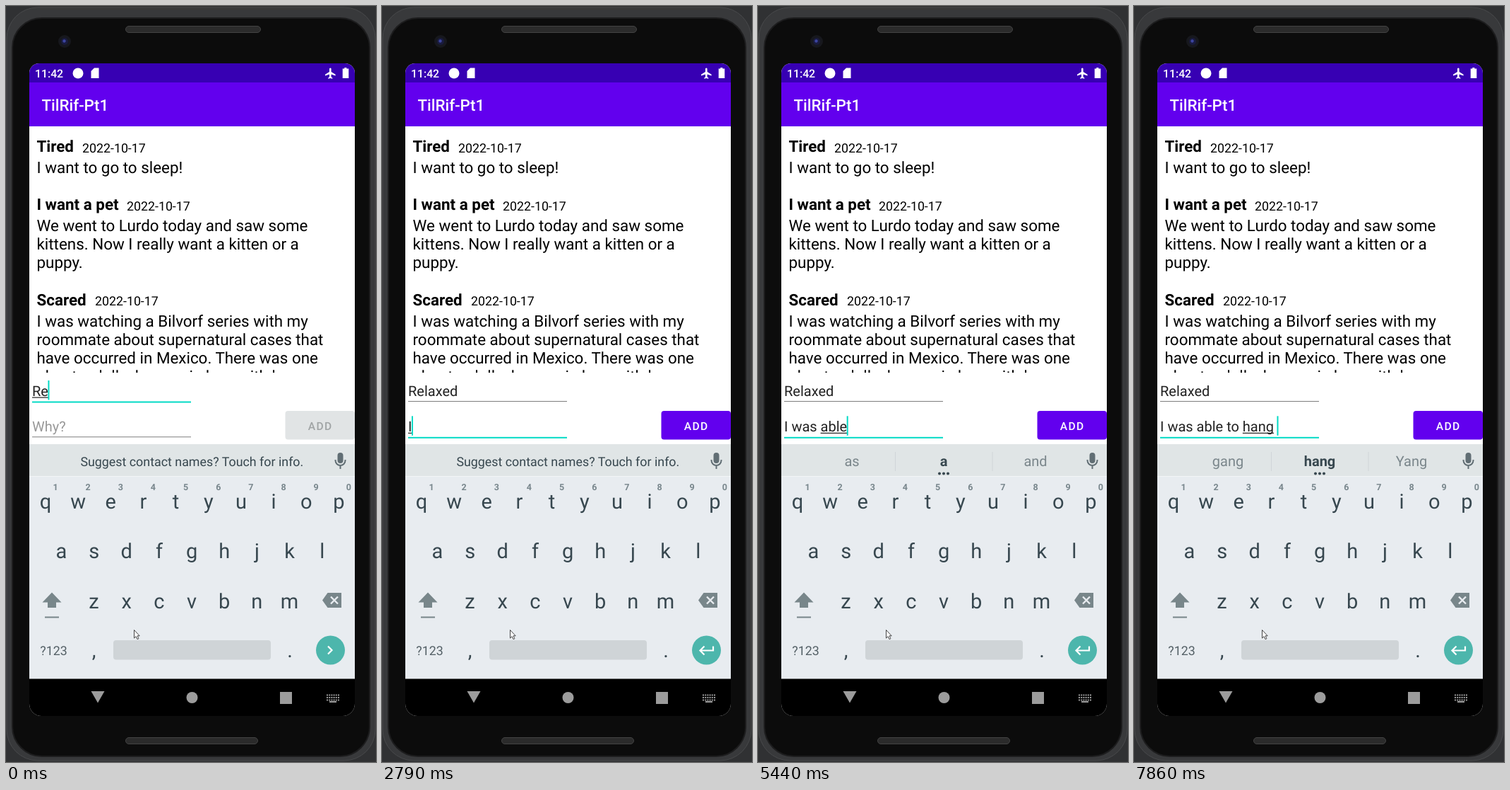
An HTML page for the animation above (8 s loop, 524 px wide and 1068 px high).

```html
<!DOCTYPE html>
<html lang="en">
<head>
<meta charset="utf-8">
<title>Mood diary on a phone</title>
<style>
  html, body { margin: 0; width: 100%; height: 100%; overflow: hidden; background: #303133; }
  svg { display: block; width: 524px; height: 1068px; }
  text { font-family: Roboto, sans-serif; white-space: pre; text-rendering: geometricPrecision; }
  .body { font-size: 22.4px; }
  .head { font-size: 22.4px; font-weight: 700; }
  .date { font-size: 17.8px; }
  .field { font-size: 20px; fill: #212121; }
  .mid { text-anchor: middle; }
  .key { font-size: 29px; fill: #37474f; text-anchor: middle; }
  .hint { font-size: 12.5px; font-weight: 700; fill: #78868c; text-anchor: middle; }
</style>
</head>
<body>
<svg viewBox="0 0 524 1068">
  <defs>
    <clipPath id="screen"><path d="M33 95a14 14 0 0 1 14-14H480a14 14 0 0 1 14 14V986a17 17 0 0 1-17 17H50a17 17 0 0 1-17-17z"/></clipPath>
    <clipPath id="list"><path d="M33 170H494V518H33z"/></clipPath>
  </defs>

  <!-- phone -->
  <rect width="524" height="1068" fill="#303133"/>
  <rect x="1" y="2" width="522" height="1064" rx="44" fill="#38393b" stroke="#48494b"/>
  <rect x="9" y="17" width="506" height="1043" rx="42" fill="#0c0c0c" stroke="#1d1d1e" stroke-width="2"/>
  <g fill="#2b2b2b" stroke="#434343">
    <rect x="169.5" y="28.5" width="191" height="9" rx="4.5"/>
    <rect x="169.5" y="1033.5" width="187" height="9" rx="4.5"/>
  </g>
  <circle cx="83" cy="50" r="9" fill="#17181d"/>
  <circle cx="83" cy="50" r="5" fill="#191b3d"/>
  <circle cx="82.500" cy="49.500" r="2.200" fill="#3c45a0"/>

  <g clip-path="url(#screen)">
    <rect x="33" y="81" width="461" height="922" fill="#fff"/>
    <rect x="33" y="81" width="461" height="28" fill="#3700b3"/>
    <rect x="33" y="108" width="461" height="62" fill="#6200ee"/>
    <g fill="#fff">
      <text x="41" y="100.500" font-size="15.8" font-weight="500">11:42</text>
      <circle cx="102" cy="95" r="7.500"/>
      <path d="M125 87.500H131.500V102H120.500V92z"/>
      <path d="M458 88.500q1.300-2 2.600 0V93l6 3.800v1.700l-6-1.900v3.600l1.700 1.300v1.200l-3-.8-3 .8v-1.200l1.700-1.300v-3.600l-6 1.900v-1.700l6-3.800z"/>
      <path d="M479.300 87h3v1.600h3V102h-8.600V88.600h2.600z"/>
      <text x="50.500" y="148" font-size="22.4" font-weight="500">TilRif-Pt1</text>
    </g>

    <g id="entries" clip-path="url(#list)"></g>

    <!-- keyboard -->
    <rect x="33" y="619" width="461" height="332" fill="#e8ecf0"/>
    <rect x="33" y="619" width="461" height="45" fill="#e0e5e6"/>
    <path d="M33 664.500H494" stroke="#f3f5f6"/>
    <g id="keys"></g>
    <g fill="none" stroke="#616e74" stroke-width="2">
      <rect x="470.500" y="632" width="6" height="13" rx="3" fill="#616e74"/>
      <path d="M466.500 641v1a7 7 0 0 0 14 0v-1M473.500 649v5"/>
    </g>
    <path d="M65 828.500L78.500 842.500H71V850H59V842.500H51.500z" fill="#78868a"/>
    <path d="M55 863.500H75" stroke="#78868a" stroke-width="2"/>
    <path d="M448 839.500L455.500 829H475V850H455.500z" fill="#78868a"/>
    <path d="M460 834.500l10 10m0-10l-10 10" stroke="#e8ecf0" stroke-width="2.400"/>
    <text x="67.500" y="916.500" font-size="17.8" fill="#546066" class="mid">?123</text>
    <rect x="152" y="896" width="223" height="27.500" rx="4" fill="#cfd4d7"/>
    <circle cx="459.500" cy="910" r="20.500" fill="#4db6ac"/>
    <path id="action" fill="none" stroke="#fff" stroke-width="2.200"/>

    <!-- navigation bar -->
    <rect x="33" y="950.500" width="461" height="53" fill="#000"/>
    <g fill="#9c9c9c">
      <path d="M120.500 968H139.500L130 984.500z"/>
      <circle cx="263.500" cy="977" r="8"/>
      <rect x="388" y="969" width="17" height="17"/>
      <path d="M458 982h10v2h-10z"/>
    </g>
    <path d="M454 973.500H472M454 977H472M454 980.500H472" stroke="#9c9c9c" stroke-width="2" stroke-dasharray="2 1.200"/>

    <!-- changing parts -->
    <g id="form"></g>
    <g id="bar"></g>
  </g>
  <path d="M181.500 881.500V893l2.600-2.400 1.900 4 1.900-.9-1.900-3.900h3.200z" fill="#fff" stroke="#333" stroke-width=".9"/>
</svg>

<script>
const LOOP = 8000, TEAL = '#03dac5', NOTICE = 'Suggest contact names? Touch for info.';
const FIELD_X = 37;
const $ = id => document.getElementById(id);
const text = (x, y, cls, s, extra = '') => `<text x="${x}" y="${y}" class="${cls}" ${extra}>${s}</text>`;
const rect = (x, y, w, h, fill, extra = '') => `<rect x="${x}" y="${y}" width="${w}" height="${h}" fill="${fill}" ${extra}/>`;

const pen = document.createElement('canvas').getContext('2d');
const widthOf = s => { pen.font = '20px Roboto, sans-serif'; return pen.measureText(s).width; };

// title, date x, baseline, lines
const entries = [
  ['Tired', 108, 206, ['I want to go to sleep!']],
  ['I want a pet', 171, 288, ['We went to Lurdo today and saw some', 'kittens. Now I really want a kitten or a', 'puppy.']],
  ['Scared', 126, 422.5, ['I was watching a Bilvorf series with my', 'roommate about supernatural cases that',
    'have occurred in Mexico. There was one', 'about a doll who was in love with her']],
];
$('entries').innerHTML = entries.map(([title, dateX, y, lines]) =>
  text(43.5, y, 'head', title) + text(dateX, y + 0.7, 'date', '2022-10-17') +
  lines.map((line, i) => text(43.5, y + 30 + i * 26.2, 'body', line)).join('')).join('');

const keyRow = (letters, x, y) => [...letters].map((c, i) => text(x + i * 46.15, y, 'key', c)).join('');
$('keys').innerHTML = keyRow('qwertyuiop', 56, 709.5) + keyRow('asdfghjkl', 78.5, 780) +
  keyRow('zxcvbnm', 124.5, 850.5) + keyRow(',', 124.5, 920) + keyRow('.', 402, 920) +
  [...'1234567890'].map((c, i) => text(70 + i * 46.15, 684, 'hint', c)).join('');

// Each step changes only the listed properties; "word" is the underlined word.
const steps = [
  [0, { mood: 'Re', why: '', word: 'Re', bar: NOTICE, focus: 'mood', caret: true }],
  [120, { bar: 'Red|Re|Rest' }],
  [500, { mood: 'Rela', word: 'Rela' }],
  [900, { mood: 'Relax', word: 'Relax' }],
  [1060, { bar: NOTICE }],
  [1200, { mood: 'Relaxed', word: 'Relaxed' }],
  [1330, { bar: 'Relaxes|Relaxed|Relax' }],
  [1480, { focus: 'why', word: '' }],
  [1620, { bar: NOTICE }],
  [2050, { caret: false }],
  [2520, { caret: true }],
  [2660, { why: 'I', word: 'I' }],
  [2800, { bar: "I'm|I|I'll" }],
  [2940, { why: 'I ', word: '' }],
  [3220, { bar: NOTICE }],
  [3470, { caret: false }],
  [4020, { caret: true }],
  [4180, { why: 'I w', word: 'w' }],
  [4320, { bar: 'we|w|was' }],
  [4450, { why: 'I wa', word: 'wa' }],
  [4590, { why: 'I was', word: 'was' }],
  [4720, { bar: "WA's|was|ways" }],
  [4860, { why: 'I was ', word: '' }],
  [4990, { why: 'I was a' }],
  [5140, { word: 'a', bar: 'as|a|and' }],
  [5290, { why: 'I was ab', word: 'ab' }],
  [5440, { why: 'I was able', word: 'able' }],
  [5600, { bar: 'able|able|ankle' }],
  [5750, { why: 'I was able ', word: '', bar: NOTICE }],
  [5900, { why: 'I was able t', word: 't' }],
  [6050, { bar: 'the|t|to' }],
  [6200, { why: 'I was able to', word: 'to' }],
  [6350, { bar: 'too|to|top' }],
  [6500, { why: 'I was able to ', word: '' }],
  [6660, { bar: NOTICE }],
  [6810, { why: 'I was able to h', word: 'h' }],
  [6970, { bar: 'he|h|his' }],
  [7120, { why: 'I was able to ha', word: 'ha' }],
  [7270, { bar: 'had|ha|have' }],
  [7420, { why: 'I was able to han', word: 'han' }],
  [7570, { why: 'I was able to hang', word: 'hang' }],
  [7710, { bar: 'gang|hang|Yang' }],
  [7860, { why: 'I was able to hang ' }],
];

function field(value, y, focused, state) {
  let out = focused ? rect(FIELD_X, y + 7.5, 225, 2, TEAL) : rect(FIELD_X, y + 7, 225, 1, '#7d7d7d');
  out += value ? text(FIELD_X, y, 'field', value) : text(FIELD_X, y, 'field', 'Why?', 'style="fill:#999"');
  if (!focused) return out;
  if (state.word) {
    const start = value.lastIndexOf(state.word);
    out += rect(FIELD_X + widthOf(value.slice(0, start)), y + 1.5, widthOf(state.word), 1.2, '#212121');
  }
  if (state.caret) out += rect(FIELD_X - 0.5 + widthOf(value), y - 22, 2, 27.5, TEAL);
  return out;
}

function suggestions(bar) {
  if (bar === NOTICE) return text(263.3, 650, 'mid', bar, 'font-size="17.85" fill="#37474f"');
  const words = bar.split('|').map((w, i) => text(133 + i * 130, 650, 'mid', w,
    `font-size="20" ${i === 1 ? 'font-weight="700" fill="#37474f"' : 'fill="#7a868b"'}`)).join('');
  const dots = [257, 263, 269].map(x => `<circle cx="${x}" cy="660.5" r="2" fill="#37474f"/>`).join('');
  return words + dots + rect(194, 630, 1, 27, '#cfd5d8') + rect(331.5, 630, 1, 27, '#cfd5d8');
}

function draw(state) {
  const ready = state.why !== '';
  $('form').innerHTML =
    field(state.mood, 551, state.focus === 'mood', state) +
    field(state.why, 601.3, state.focus === 'why', state) +
    rect(395.5, 572, 98.5, 40.5, ready ? '#6200ee' : '#e1e4e5', 'rx="4"') +
    text(427.7, 598.5, '', 'ADD', `font-size="15.6" font-weight="500" letter-spacing="1.4" fill="${ready ? '#fff' : '#a0a4a5'}"`);
  $('bar').innerHTML = suggestions(state.bar);
  $('action').setAttribute('d', state.focus === 'mood'
    ? 'M456 904.5l5.500 5.500-5.500 5.500'
    : 'M469 904.500V910.500H451M456.500 904.500l-6 6 6 6');
}

let shown = -1;
function tick() {
  const t = performance.now() % LOOP;
  const past = steps.filter(([at]) => at <= t);
  if (past.length !== shown) {
    shown = past.length;
    draw(Object.assign({}, ...past.map(([, change]) => change)));
  }
  requestAnimationFrame(tick);
}
tick();
</script>
</body>
</html>
```
